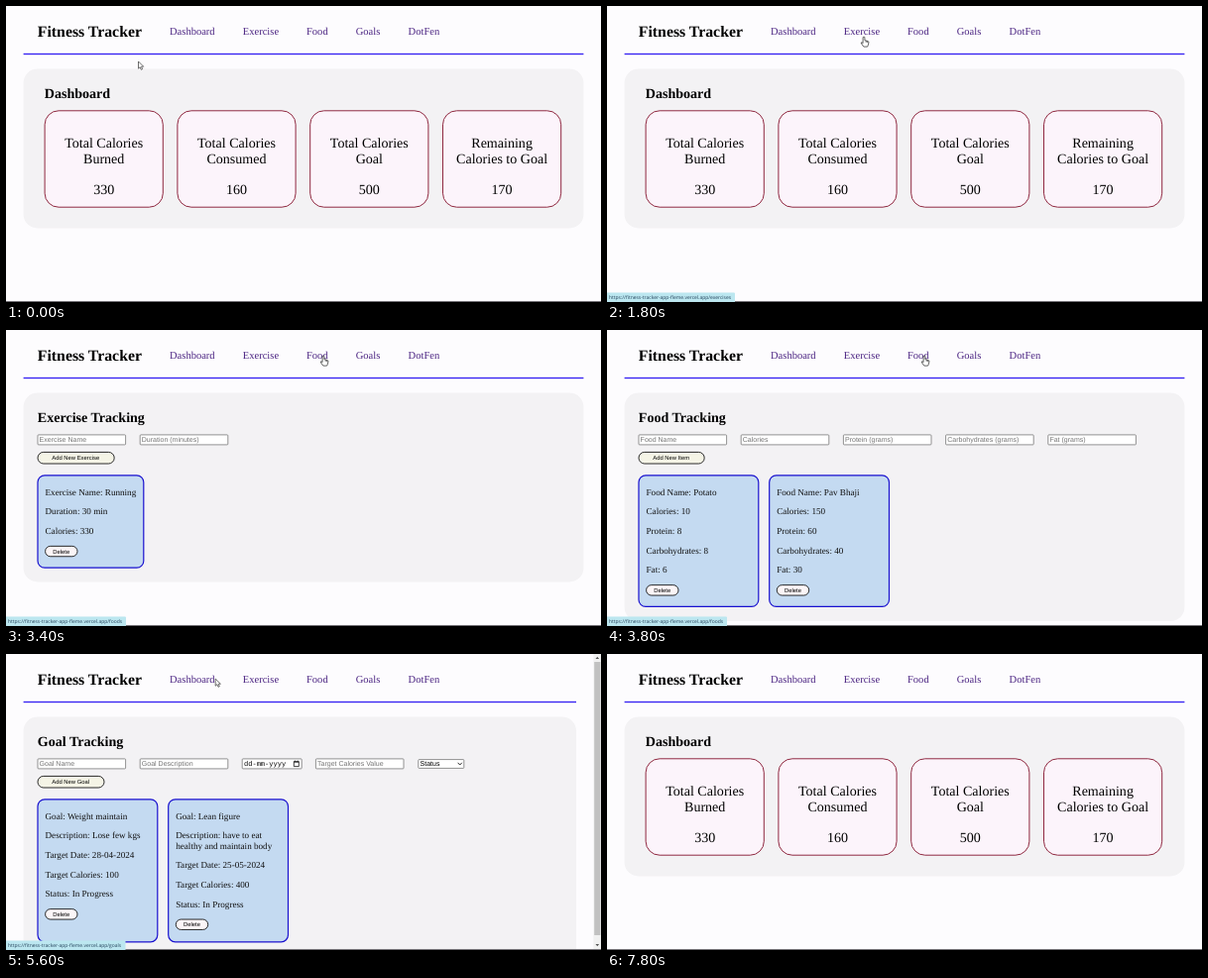
These frames come from a looping animation (600x299 px, 7.9 s). An HTML page:

```html
<!DOCTYPE html>
<html lang="en">
<head>
<meta charset="utf-8">
<title>Fitness Tracker</title>
<style>
  html, body { margin: 0; height: 100%; overflow: hidden; background: #fdfcfe; }
  svg { display: block; width: 100vw; height: 100vh; }
  text { font-family: "Liberation Serif", "Times New Roman", serif; text-rendering: geometricPrecision; white-space: pre; }
  .ui { font-family: "Liberation Sans", Arial, sans-serif; }
  .mono { font-family: "Liberation Mono", "Courier New", monospace; }
  .url { font-family: "Open Sans", "Noto Sans", sans-serif; }
</style>
</head>
<body>
<svg id="stage" viewBox="0 0 600 299"></svg>
<script>
const LOOP = 7900, STEP = 100;
const SITE = "https://fitness-tracker-app-fleme.vercel.app";

const text = (x, y, size, str, attrs = "") =>
  `<text x="${x}" y="${y}" font-size="${size}" ${attrs}>${str}</text>`;
const box = (x, y, w, h, r, fill, stroke = "none", width = 0.9) =>
  `<rect x="${x}" y="${y}" width="${w}" height="${h}" rx="${r}" fill="${fill}" stroke="${stroke}" stroke-width="${width}"/>`;
const path = (d, attrs) => `<path d="${d}" ${attrs}/>`;

const links = [["Dashboard", 165, 211], ["Exercise", 238.8, 275], ["Food", 303, 325],
  ["Goals", 352.7, 378], ["DotFen", 405.6, 437.5]];

function header(right) {
  return text(31.8, 31.4, 15.8, "Fitness Tracker", 'font-weight="bold"') +
    links.map(([name, x]) => text(x, 29.2, 10.54, name, 'fill="#4b2482"')).join("") +
    box(17.6, 47.8, right - 17.6, 1.4, 0, "#3a26f2");
}

function page(title, titleX, bottom, content, right = 582.4) {
  return header(right) + box(17.6, 63.6, right - 17.6, bottom - 63.6, 14, "#f3f2f4") +
    text(titleX, 92.6, 14.05, title, 'font-weight="bold"') + content;
}

const field = (x, hint, w = 88.6) =>
  box(x, 105.9, w, 10, 0.8, "#fff", "#767676", 0.8) + text(x + 1.6, 113.3, 7.03, hint, 'class="ui" fill="#757575"');

const button = (x, y, w, h, fill, label, pad) =>
  box(x, y, w, h, h / 2, fill, "#151515") + text(x + pad, y + h / 2 + 2.1, 5.86, label, 'class="ui"');

const addButton = (w, label) => button(32, 123.4, w, 11.6, "#f5f4e6", label, 14.3);

// Lines starting with "+" continue the paragraph above.
function card(x, w, bottom, lines) {
  let y = 147, out = box(x, 146.8, w, bottom - 146.8, 7, "#c4daf1", "#1a12cf", 1.2);
  for (const line of lines) {
    const wrapped = line[0] === "+";
    y += wrapped ? 10.4 : 19.65;
    out += text(x + 7.5, y, 9.13, line.replace("+", ""), 'fill="#111"');
  }
  return out + button(x + 7.6, y + 12.4, 32.4, 10.4, "#fbf5f7", "Delete", 7.7);
}

function stat(i, lines, value) {
  const x = 39.1 + i * 133.8, mid = x + 59.6, centred = 'text-anchor="middle"';
  return box(x, 105.8, 119.2, 97.4, 14, "#fcf4fb", "#8f2840", 1) +
    lines.map((s, k) => text(mid, 143.2 + k * 16.2, 14.05, s, centred)).join("") +
    text(mid, 189.6, 14.05, value, centred);
}

const scrollbar = box(592.4, 0, 8, 299, 0, "#f1f1f1") + box(593.2, 8, 6.2, 276, 0, "#c1c1c1") +
  path("M594.5 5l1.8-2.2 1.8 2.2zM594.5 293l1.8 2.2 1.8-2.2z", 'fill="#555"');

const dateField = box(238.2, 105.9, 60, 10, 0.8, "#fff", "#767676", 0.8) +
  text(240, 113.3, 7.03, "dd-mm-yyyy", 'class="mono"') +
  path("M290.3 108.6h5v5h-5zM290.3 109.2h5M291.4 107.6v1M294.2 107.6v1", 'fill="none" stroke="#111" stroke-width=".8"');
const select = box(415.8, 106.6, 46, 8.8, 0.8, "#fff", "#767676", 0.8) +
  text(417.6, 113.3, 7.03, "Status", 'class="ui"') +
  path("M455.6 109.8l2.1 2.2 2.1-2.2", 'fill="none" stroke="#111" stroke-width=".9"');

const pages = {
  dashboard: page("Dashboard", 38.8, 224.4,
    stat(0, ["Total Calories", "Burned"], 330) + stat(1, ["Total Calories", "Consumed"], 160) +
    stat(2, ["Total Calories", "Goal"], 500) + stat(3, ["Remaining", "Calories to Goal"], 170)),
  exercise: page("Exercise Tracking", 31.8, 254.4,
    field(32, "Exercise Name") + field(135.2, "Duration (minutes)") + addButton(77.2, "Add New Exercise") +
    card(32, 106.8, 240.2, ["Exercise Name: Running", "Duration: 30 min", "Calories: 330"])),
  food: page("Food Tracking", 31.8, 294,
    ["Food Name", "Calories", "Protein (grams)", "Carbohydrates (grams)", "Fat (grams)"]
      .map((s, i) => field(32 + i * 103.2, s)).join("") + addButton(66.2, "Add New Item") +
    card(32, 120.8, 279.4, ["Food Name: Potato", "Calories: 10", "Protein: 8", "Carbohydrates: 8", "Fat: 6"]) +
    card(163.7, 120.8, 279.4, ["Food Name: Pav Bhaji", "Calories: 150", "Protein: 60", "Carbohydrates: 40", "Fat: 30"])),
  goals: page("Goal Tracking", 31.8, 320,
    field(32, "Goal Name") + field(135.2, "Goal Description") + dateField +
    field(312.4, "Target Calories Value") + select + addButton(67, "Add New Goal") +
    card(32, 120.8, 290.8, ["Goal: Weight maintain", "Description: Lose few kgs", "Target Date: 28-04-2024",
      "Target Calories: 100", "Status: In Progress"]) +
    card(163.7, 120.8, 290.8, ["Goal: Lean figure", "Description: have to eat", "+healthy and maintain body",
      "Target Date: 25-05-2024", "Target Calories: 400", "Status: In Progress"]) + scrollbar, 575)
};

const arrow = path("M0 0v7.2l1.7-1.5 1.1 2.6 1.3-.6-1.1-2.5h2.2z",
  'fill="#fff" stroke="#333" stroke-width=".7" stroke-linejoin="round"');
const hand = path("M-.9 6.6V.6q.9-1.3 1.8 0v3l3.2.9q.9.3.8 1.3l-.5 2.6-.8 1.7H-.2l-2.3-3.2q-.6-1.3.5-1.2zM2.2 4.2v1.5M3.6 4.6v1.3",
  'fill="#fff" stroke="#222" stroke-width=".7" stroke-linejoin="round"');

// Schedules: [time, value]
const views = [[0, "dashboard"], [2500, "exercise"], [3600, "food"], [4900, "goals"], [6100, "dashboard"]];
const status = [[0, null], [1500, ["/exercises", 129]], [3200, ["/foods", 121]], [4600, ["/goals", 120.5]],
  [5900, ["", 106]], [6900, null]];
const track = [[0, 133.5, 56], [400, 133.5, 56], [1500, 257, 31], [1800, 259, 31], [2600, 268, 27], [2800, 268, 27],
  [3300, 320, 26], [4100, 320, 26], [4700, 368, 27], [5100, 368, 27], [5600, 211.2, 25], [6000, 184, 20.5],
  [6400, 184, 20], [7000, 190, -14], [LOOP, 190, -14]];

const current = (list, t) => list.filter(([start]) => start <= t).pop()[1];

function pointer(t) {
  const i = track.findIndex(k => k[0] > t);
  const [t0, x0, y0] = track[i - 1], [t1, x1, y1] = track[i];
  const u = (t - t0) / (t1 - t0), e = u * u * (3 - 2 * u);
  const x = x0 + (x1 - x0) * e, y = y0 + (y1 - y0) * e;
  const over = y > 18 && y < 33 && links.some(([, a, b]) => x >= a && x <= b);
  return `<g transform="translate(${x} ${y})">${over ? hand : arrow}</g>`;
}

function statusBar(entry) {
  if (!entry) return "";
  const [route, w] = entry;
  return box(-2, 289.6, w + 2, 11, 1, "#bce7f0") + text(2, 296.2, 4.98, SITE + route, 'class="url" fill="#23415a"');
}

const stage = document.getElementById("stage");
let last = -1;
function draw(now) {
  const t = Math.floor(now % LOOP / STEP) * STEP;
  if (t !== last) {
    last = t;
    stage.innerHTML = pages[current(views, t)] + box(0, 298, 600, 1, 0, "#77757a") +
      statusBar(current(status, t)) + pointer(t);
  }
  requestAnimationFrame(draw);
}
draw(performance.now());
</script>
</body>
</html>
```
